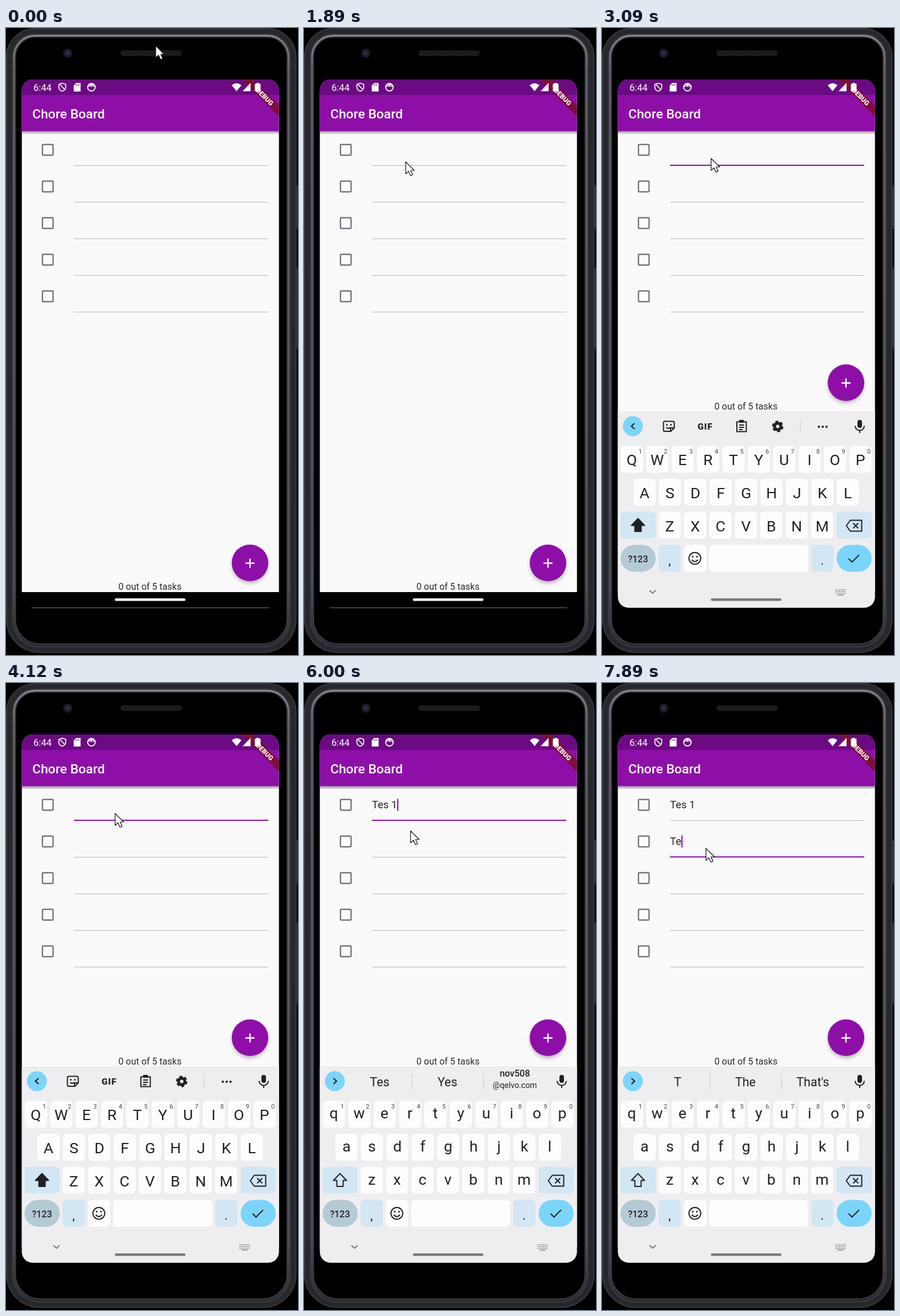
Write an HTML page that moves like this. It is 511 px wide and 1096 px high and loops after 8000 ms.

```html
<!DOCTYPE html>
<html lang="en">
<head>
<meta charset="utf-8">
<title>Task list</title>
<style>
html, body { margin: 0; width: 100%; height: 100%; overflow: hidden; background: #000; }
svg { display: block; width: 100%; height: 100%; font-family: Roboto, "Noto Sans", sans-serif; }
text { white-space: pre; }
.mid { text-anchor: middle; }
.line { fill: none; stroke: #202124; stroke-width: 2; }
</style>
</head>
<body>
<svg id="stage" viewBox="0 0 511 1096"></svg>
<script>
const LOOP = 8000, STEP = 171.5;
const PURPLE = '#8e0fa8', INK = '#202124', BLUE = '#7bd5fb', PALE = '#d3e6f3', RULE = '#b6b6b6';

const attrs = o => Object.entries(o).map(([k, v]) => `${k}="${v}"`).join(' ');
const rect = (x, y, width, height, rx, fill, more = {}) =>
  `<rect ${attrs({ x, y, width, height, rx, fill, ...more })}/>`;
const circle = (cx, cy, r, fill, more = {}) => `<circle ${attrs({ cx, cy, r, fill, ...more })}/>`;
const path = (d, more = {}) => `<path ${attrs({ d, ...more })}/>`;
const line = (d, more = {}) => path(d, { class: 'line', ...more });
const text = (s, x, y, size, fill, more = {}) =>
  `<text ${attrs({ x, y, 'font-size': size, fill, ...more })}>${s}</text>`;
const mid = (s, x, y, size, fill = INK, more = {}) => text(s, x, y, size, fill, { class: 'mid', ...more });
const group = (id, body, more = {}) => `<g ${attrs({ id, ...more })}>${body}</g>`;
const times = (n, fn) => Array.from({ length: n }, (_, i) => fn(i)).join('');

function defs() {
  return `<defs>
    <clipPath id="screen"><rect x="27.7" y="90" width="450" height="923.5" rx="19"/></clipPath>
    <linearGradient id="rim" x1="0" y1="0" x2="0" y2="1">
      <stop offset="0" stop-color="#8d8e95"/><stop offset=".06" stop-color="#64656c"/>
      <stop offset=".9" stop-color="#50515a"/><stop offset="1" stop-color="#26262b"/>
    </linearGradient>
    <linearGradient id="drop" x1="0" y1="0" x2="0" y2="1">
      <stop offset="0" stop-color="#000" stop-opacity=".38"/><stop offset="1" stop-color="#000" stop-opacity="0"/>
    </linearGradient>
    <filter id="blur" x="-50%" y="-50%" width="200%" height="200%"><feGaussianBlur stdDeviation="4"/></filter>
  </defs>`;
}

// Phone outline inset by d, with rounder corners at the bottom.
function shell(d, more) {
  const l = 1 + d, r = 507.5 - d, t = 1 + d * .95, b = 1091.5 - d * .95, a = 50 - d, c = 58 - d;
  return path(`M${l + a} ${t}H${r - a}A${a} ${a} 0 0 1 ${r} ${t + a}V${b - c}A${c} ${c} 0 0 1 ${r - c} ${b}`
    + `H${l + c}A${c} ${c} 0 0 1 ${l} ${b - c}V${t + a}A${a} ${a} 0 0 1 ${l + a} ${t}z`, more);
}

function phone() {
  return rect(0, 0, 511, 1096, 0, '#000')
    + rect(507, 275, 4, 76, 1, '#2e2e33') + rect(507, 419, 4, 142, 1, '#2e2e33')
    + shell(0, { fill: '#27282d', stroke: '#37383e', 'stroke-width': 2 })
    + shell(13, { fill: '#000', stroke: '#3a3b42', 'stroke-width': 7 })
    + shell(13, { fill: 'none', stroke: 'url(#rim)', 'stroke-width': 2.6 })
    + circle(108, 44, 8, '#1b1b22') + circle(108, 44, 4, '#252b52')
    + rect(200, 39, 108, 10, 5, '#19191c')
    + line('M204 42h100M204 46h100', { style: 'stroke:#26262a;stroke-width:1;stroke-dasharray:2 2' });
}

function statusIcons() {
  const white = { fill: '#fff' };
  return text('6:44', 48, 109.5, 16.5, '#fff')
    + path('M98.5 96.5l6 2v5c0 4-3 6-6 7c-3-1-6-3-6-7v-5zM94 98l9 10', { fill: 'none', stroke: '#fff', 'stroke-width': 1.7 })
    + path('M123 96h7.5v15h-12v-10.5z', white)
    + path('M122.5 98.5v3M125 98v3M127.5 98v3', { stroke: '#6b0a82', 'stroke-width': 1 })
    + circle(149.5, 103.5, 6.6, 'none', { stroke: '#fff', 'stroke-width': 1.8 })
    + path('M143.5 100q6-6 12 0v2.5h-12z', white) + circle(147, 101, 1, '#6b0a82') + circle(152, 101, 1, '#6b0a82')
    + path('M403.5 110.5l-8.5-10.5q8.5-7 17 0z', white)
    + path('M428 96v14.5h-14z', white)
    + path('M438 96h5v1.5h2.5v13h-10v-13h2.5z', white);
}

function app() {
  const row = i => {
    const y = 213 + 64 * i;
    return rect(63.8, y - 9.3, 18.6, 18.6, 1.2, 'none', { stroke: '#6d6a74', 'stroke-width': 2.2 })
      + rect(119, y + 27, 340, 1, 0, RULE, { id: 'rule' + i })
      + text('', 119, y + 6, 18.3, '#242426', { id: 'field' + i });
  };
  return rect(27, 90, 452, 896, 0, '#fafafa')
    + rect(27, 180.5, 452, 6, 0, 'url(#drop)')
    + rect(27, 90, 452, 90.5, 0, PURPLE) + rect(27, 90, 452, 27, 0, '#6b0a82')
    + text('Chore Board', 46, 157.5, 22.86, '#fff', { 'font-weight': 500 })
    + times(5, row)
    + rect(119, 0, 2.2, 21, 0, '#a40fc4', { id: 'caret' })
    + group('foot',
        mid('0 out of 5 tasks', 252, 982, 16, '#2a2a2c')
        + circle(427, 939, 30, '#000', { opacity: .38, filter: 'url(#blur)' })
        + circle(427, 935, 32, PURPLE)
        + line('M419 935.5h16M427 927.5v16', { style: 'stroke:#fff;stroke-width:2.3' }))
    + group('banner',
        rect(-60, 32, 120, 13.7, 0, '#7d0f38')
        + mid('DEBUG', 4, 43, 11.66, '#fff', { 'font-weight': 900 }),
        { transform: 'translate(477.5 90) rotate(45)' })
    + statusIcons();
}

function keyRows(id, letters, drop) {
  const [top, home, low] = letters.split(' ');
  const put = (s, x, y) => [...s].map((c, i) => mid(c, x + 44.45 * i, y + drop, 26.5)).join('');
  return group(id, put(top, 52, 761) + put(home, 74.5, 819) + put(low, 118.5, 877));
}

function tools() {
  return line('M57 691l-5.5 5l5.5 5', { style: 'stroke-width:2.2' })
    + line('M110 687.5h14a2.5 2.5 0 0 1 2.5 2.5v9l-6 6h-10.5a2.5 2.5 0 0 1-2.5-2.5v-12.5a2.5 2.5 0 0 1 2.5-2.5zM120 705v-6h6')
    + circle(113.5, 693.5, 1.5, INK) + circle(120.5, 693.5, 1.5, INK) + line('M112.5 698q3.5 4 7 0')
    + mid('GIF', 180.5, 701.5, 15.5, INK, { 'font-weight': 800, 'letter-spacing': 1 })
    + line('M236 688.5h16.5v17h-16.5zM240 694h8.5M240 698h8.5M240 702h6')
    + rect(240, 685, 8.5, 5, 1, INK)
    + circle(307.5, 696.5, 5.5, 'none', { stroke: INK, 'stroke-width': 5 })
    + circle(307.5, 696.5, 8, 'none', { stroke: INK, 'stroke-width': 4, 'stroke-dasharray': '4.9 3.478' })
    + rect(346.5, 684, 1, 25, 0, '#c6c8cc')
    + times(3, i => circle(379.5 + 6.7 * i, 697, 2, INK));
}

function hints() {
  return line('M51.5 691l5.5 5l-5.5 5', { style: 'stroke-width:2.2' })
    + rect(188.5, 682, 1, 29, 0, '#c6c8cc') + rect(313.5, 682, 1, 29, 0, '#c6c8cc')
    + [132.5, 251, 369].map((x, i) => mid('', x, 705, 21.5, INK, { id: 'hint' + i })).join('')
    + group('mail', mid('nov508', 369, 688, 16, INK, { 'font-weight': 500 }) + mid('@qelvo.com', 369, 708, 14));
}

function keyboard() {
  const key = (x, y, w = 39, fill = '#fdfdfd', r = 7) => rect(x, y, w, 47, r, fill);
  const arrow = 'M63 857.5l-11.5 12h6v10.5h11v-10.5h6z';
  return rect(27, 670, 452, 345, 0, '#eeeef1')
    + circle(54, 696, 17.5, BLUE)
    + group('tools', tools()) + group('hints', hints())
    + rect(447, 685, 8, 14, 4, INK) + line('M443 695.5a8 8 0 0 0 16 0M451 703.5v4.5')
    + times(10, i => key(32.8 + 44.45 * i, 730.5) + mid((i + 1) % 10, 67 + 44.45 * i, 743.5, 11, '#44474a'))
    + times(9, i => key(55 + 44.45 * i, 788))
    + times(7, i => key(99 + 44.45 * i, 845.5))
    + key(32.5, 845.5, 61.5, PALE) + key(410.5, 845.5, 61.5, PALE)
    + key(32.5, 903.5, 61.5, '#b4cad5', 23.5) + key(99, 903.5, 39, PALE) + key(143.5, 903.5)
    + key(187.5, 903.5, 173.5) + key(366, 903.5, 39, PALE) + key(410.5, 903.5, 61.5, BLUE, 23.5)
    + keyRows('lower', 'qwertyuiop asdfghjkl zxcvbnm', 0)
    + keyRows('upper', 'QWERTYUIOP ASDFGHJKL ZXCVBNM', 3)
    + path(arrow, { id: 'shift', stroke: INK, 'stroke-width': 2, 'stroke-linejoin': 'round' })
    + line('M427.5 870l7-9.5h20v19h-20zM439.5 865.5l9 9M448.5 865.5l-9 9', { 'stroke-linejoin': 'round' })
    + mid('?123', 63, 934, 16, INK, { 'font-weight': 500 })
    + mid(',', 118.5, 938, 22) + mid('.', 385.5, 938, 22)
    + circle(162.5, 927, 10.3, 'none', { class: 'line' })
    + circle(158.8, 924, 1.6, INK) + circle(166.2, 924, 1.6, INK) + line('M157 929.5q5.5 6.5 11 0')
    + line('M431.5 927.5l6 6l12.5-12.5')
    + line('M83 983l5.5 5l5.5-5', { style: 'stroke:#73757a;stroke-width:1.8' })
    + times(3, r => times(6, i => rect(408.5 + 3.2 * i, 981 + 3.2 * r, 1.8, 1.8, 0, '#85878c')))
    + rect(412, 990.5, 11, 1.6, 0, '#85878c');
}

document.getElementById('stage').innerHTML = defs() + phone()
  + `<g clip-path="url(#screen)">${app()}${group('keys', keyboard())}</g>`
  + rect(190.5, 997, 123.5, 4.5, 2.2, '#fff', { id: 'pill' })
  + path('M0 0v21l5-4.5l3.5 7.7l3.8-1.7l-3.5-7.5h6.2z',
      { id: 'mouse', fill: '#fff', stroke: '#111', 'stroke-width': 1.2, 'stroke-linejoin': 'round' });

const el = id => document.getElementById(id);
const show = (id, on) => el(id).setAttribute('visibility', on ? 'inherit' : 'hidden');
const shift = (id, x, y) => el(id).setAttribute('transform', `translate(${x.toFixed(2)} ${y.toFixed(2)})`);

// Each entry: step number, then the value that holds from there on.
const TYPED = [
  [[0, ''], [26, 'T'], [28, 'Te'], [29, 'Tes'], [30, 'Tes '], [33, 'Tes 1']],
  [[0, ''], [44, 'T'], [46, 'Te']]
];
const FOCUS = [[0, -1], [14, 0], [40, 1]];
const CARET = [[0, -1], [14, 0], [39, 1]];
const CAPS = [[0, false], [18, true], [26, false], [41, true], [44, false]];
const T_WORDS = ['T', 'The', "That's"], TES_WORDS = ['Tes', 'Yes', ''];
const HINTS = [[0, null], [27, T_WORDS], [30, TES_WORDS], [39, null], [45, T_WORDS]];
const CARET_START = [14, 26, 28, 29, 30, 33, 39, 44, 46];
const MOUSE = [[0, 262, 31], [5, 184, 212], [6, 184, 212], [8, 174, 228], [9, 174, 228],
  [11, 178, 234], [13, 191, 228], [33, 191, 228], [37, 182, 289], [47, 182, 289]];

const at = (table, n) => table.filter(e => e[0] <= n).pop()[1];

function mouseAt(n) {
  const i = Math.max(1, MOUSE.findIndex(p => p[0] >= n));
  const [a, ax, ay] = MOUSE[i - 1], [b, bx, by] = MOUSE[i];
  const p = (n - a) / (b - a), e = p * p * (3 - 2 * p);
  return [ax + (bx - ax) * e, ay + (by - ay) * e];
}

function draw(n) {
  const now = n * STEP;
  const p = Math.min(1, Math.max(0, (now - 2558) / 370));
  const top = Math.round(1013 - 343 * (1 - (1 - p) ** 2));
  shift('keys', 0, top - 670);
  shift('foot', 0, Math.min(985, top) - 985);
  el('pill').setAttribute('fill', n < 17 ? '#fff' : '#7b7b7e');

  const focus = at(FOCUS, n), caret = at(CARET, n);
  for (let i = 0; i < 2; i++) {
    el('field' + i).textContent = at(TYPED[i], n);
    const rule = el('rule' + i), on = i === focus;
    rule.setAttribute('fill', on ? PURPLE : RULE);
    rule.setAttribute('height', on ? 2 : 1);
    rule.setAttribute('y', 64 * i + (on ? 239 : 240));
  }
  const since = now - CARET_START.filter(s => s <= n).pop() * STEP;
  show('caret', caret >= 0 && since % 1000 < 500);
  if (caret >= 0) shift('caret', el('field' + caret).getComputedTextLength(), 202.5 + 64 * caret);

  const caps = at(CAPS, n), words = at(HINTS, n);
  show('upper', caps);
  show('lower', !caps);
  el('shift').setAttribute('fill', caps ? INK : 'none');
  show('tools', !words);
  show('hints', words);
  show('mail', words === TES_WORDS);
  (words || ['', '', '']).forEach((w, i) => { el('hint' + i).textContent = w; });
  shift('mouse', ...mouseAt(n));
}

let last = -1;
function tick() {
  const n = Math.floor((performance.now() % LOOP + 6) / STEP);
  if (n !== last) draw(last = n);
  requestAnimationFrame(tick);
}
tick();
</script>
</body>
</html>
```
